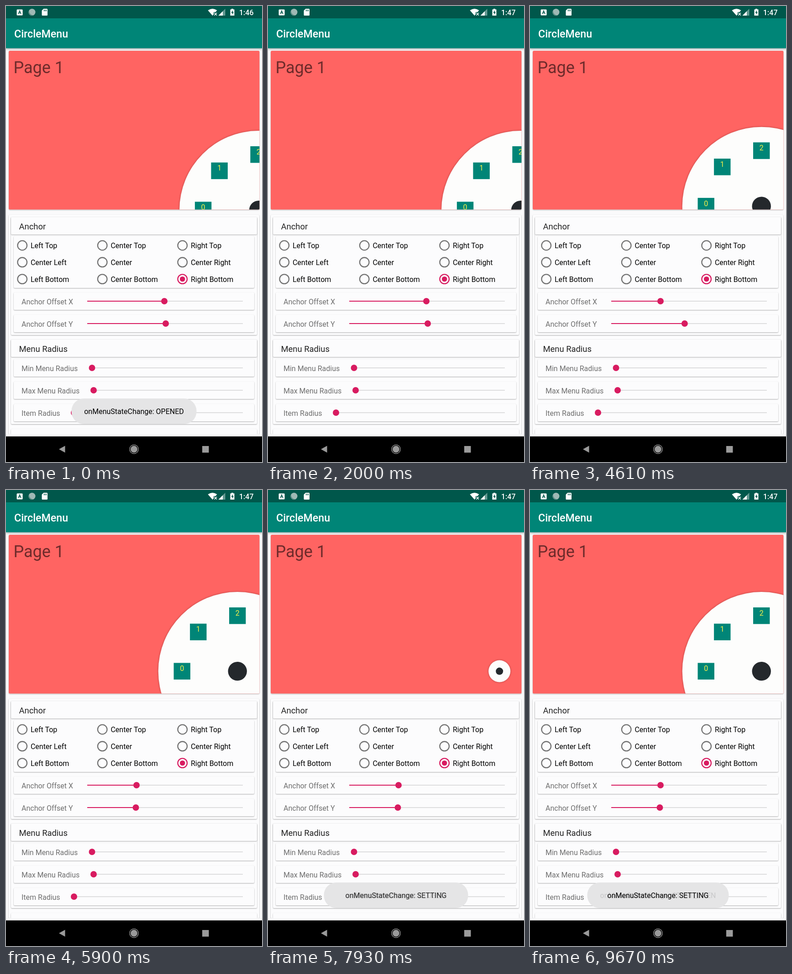
Animation, 561 px wide and 998 px high, one loop 9750 ms. Source, as an HTML page:

```html
<!DOCTYPE html>
<html lang="en">
<head>
<meta charset="utf-8">
<title>CircleMenu</title>
<style>
  html, body { margin: 0; width: 100%; height: 100%; overflow: hidden; background: #fafafb; }
  svg { display: block; width: 561px; height: 998px; font: 16px Roboto, sans-serif; }
  .card { fill: #fcfcfd; filter: drop-shadow(0 1.5px 1.3px rgba(0, 0, 0, .32)); }
  .head { font-size: 18.4px; fill: #222; }
  .label { fill: #6e6e6e; }
  .accent { fill: #d81b60; }
  .mid { text-anchor: middle; }
</style>
</head>
<body>
<svg id="stage" viewBox="0 0 561 998">
  <defs>
    <clipPath id="page"><rect x="6" y="98" width="549.5" height="347.5" rx="2.5"/></clipPath>
    <clipPath id="panel"><rect x="0" y="450" width="561" height="487"/></clipPath>
  </defs>
  <rect width="561" height="998" fill="#fafafb"/>

  <rect y="27" width="561" height="65.5" fill="#008577" style="filter:drop-shadow(0 2px 2px rgba(0,0,0,.3))"/>
  <rect width="561" height="27" fill="#00574b"/>
  <text x="18" y="69" font-size="23.2" font-weight="500" fill="#fff">CircleMenu</text>

  <g fill="#fff">
    <rect x="23.5" y="7.5" width="13" height="13" rx="1.5"/>
    <path d="M27 17.5L30 10.5L33 17.5M28 15.3H32" fill="none" stroke="#00574b" stroke-width="1.5"/>
    <circle cx="57" cy="13.5" r="7.5" fill="#9fb9b5"/>
    <path d="M51 9A7.5 7.5 0 0 0 61 20A9 9 0 0 1 51 9" fill="#5d8f87"/>
    <path d="M82.5 6H89.5Q91 6 91 7.5V19.5Q91 21 89.5 21H80Q78.5 21 78.5 19.5V10Z"/>
    <path d="M83.5 8V11.5M86 8V11.5M88.5 8V11.5" stroke="#00574b" stroke-width="1.2"/>
    <path d="M442.500 9.500Q452.500 2.500 462.500 9.500L459 13.500H455V18.500L452.500 21Z"/>
    <path d="M456.500 15L462 20.500M462 15L456.500 20.500" stroke="#fff" stroke-width="1.6"/>
    <path d="M480.500 6V21H465.500Z" opacity=".4"/>
    <path d="M475 11.500V21H465.500Z"/>
    <path d="M491.500 7.500H494V6H498V7.500H500.500V21H491.500Z"/>
    <path d="M497 9.500L493.500 15H495.700V19L499 13.500H497Z" fill="#00574b"/>
    <text id="clock" x="511" y="20" font-weight="500"></text>
  </g>

  <rect class="card" x="6" y="98" width="549.5" height="347.5" rx="2.5"/>
  <g clip-path="url(#page)">
    <rect x="6" y="98" width="550" height="348" fill="#ff6462"/>
    <text x="16.500" y="147" font-size="36" fill="#6f2b2b">Page 1</text>
    <g id="menu">
      <circle id="disc" fill="#fdfdfc" style="filter:drop-shadow(0 0 2px rgba(0,0,0,.3))"/>
      <g id="items"></g>
      <circle id="hub" fill="#24282c"/>
    </g>
  </g>

  <g id="settings" clip-path="url(#panel)"></g>

  <g id="toast" class="mid">
    <rect id="pill" y="859" height="56" rx="27" fill="#e5e5e6"/>
  </g>

  <rect y="942" width="561" height="56"/>
  <g fill="#9b9b9b">
    <path d="M116 970L129.500 962.500V977.500Z"/>
    <circle cx="280.500" cy="970" r="7.500"/>
    <circle cx="280.500" cy="970" r="9.700" fill="none" stroke="#9b9b9b" stroke-width="1.300"/>
    <rect x="430" y="963" width="14.500" height="14.500"/>
  </g>
</svg>
<script>
const LOOP = 9750, LAST_CHANGE = 9670, ITEM_MS = 165;
const $ = id => document.getElementById(id);

function add(parent, tag, attrs, text = '') {
  const el = document.createElementNS('http://www.w3.org/2000/svg', tag);
  set(el, attrs);
  el.textContent = text;
  return parent.appendChild(el);
}
function set(el, attrs) {
  for (const name in attrs) el.setAttribute(name, attrs[name]);
}
const clamp = v => Math.max(0, Math.min(1, v));

// Linear keyframes: time, value, time, value, ...
function track(t, ...keys) {
  let i = 0;
  while (i + 2 < keys.length && keys[i + 2] <= t) i += 2;
  if (t <= keys[0] || i + 2 >= keys.length) return keys[i + 1];
  const [t0, v0, t1, v1] = keys.slice(i, i + 4);
  return v0 + (v1 - v0) * (t - t0) / (t1 - t0);
}

const settings = $('settings');
const card = (x, y, right, bottom) =>
  add(settings, 'rect', { class: 'card', x, y, width: right - x, height: bottom - y, rx: 2 });

function section(title, top, bottom) {
  card(11, top, 550, bottom);
  card(11, top, 550, top + 38);
  add(settings, 'text', { class: 'head', x: 28.5, y: top + 26.5 }, title);
}

function slider(name, y, start) {
  card(17, y - 19, 544, y + 19);
  add(settings, 'text', { class: 'label', x: 34, y: y + 6.5 }, name);
  add(settings, 'rect', { x: start, y: y - .8, width: 519 - start, height: 1.7, fill: '#d9d9da' });
  const bar = add(settings, 'rect', { class: 'accent', x: start, y: y - 1, height: 2 });
  const ripple = add(settings, 'circle', { class: 'accent', cy: y, r: 18 });
  const thumb = add(settings, 'circle', { class: 'accent', cy: y, r: 7 });
  const move = (x, glow) => {
    set(bar, { width: x - start });
    set(ripple, { cx: x, opacity: glow * .25 });
    set(thumb, { cx: x });
  };
  move(start, 0);
  return move;
}

card(6, 457, 555, 937);
section('Anchor', 462, 720);
card(17, 504, 544, 617);
['Left Top', 'Center Top', 'Right Top', 'Center Left', 'Center', 'Center Right',
 'Left Bottom', 'Center Bottom', 'Right Bottom'].forEach((name, i) => {
  const cx = 35.7 + i % 3 * 175.5, cy = 524 + Math.floor(i / 3) * 36.8;
  const on = name === 'Right Bottom';
  add(settings, 'circle', { cx, cy, r: 10.3, fill: 'none', 'stroke-width': 2.3, stroke: on ? '#d81b60' : '#737373' });
  if (on) add(settings, 'circle', { class: 'accent', cx, cy, r: 5.7 });
  add(settings, 'text', { x: cx + 18.2, y: cy + 6 }, name);
});
const moveX = slider('Anchor Offset X', 646, 178);
const moveY = slider('Anchor Offset Y', 695, 178);
section('Menu Radius', 730, 915);
slider('Min Menu Radius', 792, 188.5);
slider('Max Menu Radius', 841, 192);
slider('Item Radius', 890, 149);
card(11, 926, 550, 960);

const items = Array.from({ length: 6 }, (_, i) => {
  const g = add($('items'), 'g', {});
  add(g, 'rect', { x: -18.2, y: -18.2, width: 36.4, height: 36.4, fill: '#008577' });
  add(g, 'text', { class: 'mid', y: -.5, fill: '#f6f04a' }, i);
  return g;
});

const toasts = {
  OPENED: [1150, 1, 1650, 0],
  START_CLOSE: [6240, 0, 6500, 1, 6700, 1, 7100, .12, 7600, .12, 7900, 0],
  CLOSED: [7900, 0, 8150, 1, 8350, 1, 8510, .45, 8700, 0],
  START_OPEN: [8390, 0, 8510, .35, 8700, 1, 8950, 1, 9300, .12],
  SETTING: [6700, 0, 7100, 1, 7850, 1, 8100, .5, 8510, .5, 8700, 0, 8950, 0, 9300, 1],
};
const toastTexts = Object.entries(toasts).map(([state, keys]) =>
  [add($('toast'), 'text', { x: 280.5, y: 893 }, 'onMenuStateChange: ' + state), keys]);

function drawMenu(t, x, y) {
  set($('menu'), { transform: `translate(${553.6 + (x - 347) * .76} ${446.6 + (y - 350) * .763})` });
  const open = t < 8100 ? 1 - clamp((t - 7400) / 500) : clamp((t - 8250) / 405);
  set($('disc'), { r: 24 + 149.5 * (1 - (1 - open) ** 3) });
  set($('hub'), { r: 8 + 12.7 * open ** 2 });
  items.forEach((item, i) => {
    const p = t < 8000
      ? 1 - clamp((t - 6240) / ITEM_MS - i)
      : clamp((t - 9010) / ITEM_MS - i);
    const angle = Math.PI * (1 + i / 4), dist = 121.5 * p;
    set(item, {
      transform: `translate(${dist * Math.cos(angle)} ${dist * Math.sin(angle)}) rotate(${360 * p}) scale(${p})`,
    });
  });
}

function draw(t) {
  $('clock').textContent = t < 1000 ? '1:46' : '1:47';
  const x = track(t, 2300, 347, 2830, 300, 2990, 300, 3200, 286);
  const y = track(t, 4609, 350, 4610, 339, 5150, 284.5);
  moveX(x, track(t, 2260, 0, 2400, 1, 3540, 1, 4030, 0));
  moveY(y, track(t, 4650, 0, 4790, 1, 5440, 1, 5900, 0));
  drawMenu(t, x, y);

  const width = t < 6240 ? 274 : t < 8650 ? 316 : 310;
  set($('pill'), {
    x: 280.5 - width / 2,
    width,
    opacity: track(t, 1150, 1, 1650, 0, 6240, 0, 6500, 1, 8350, 1, 8510, .4, 8700, 1),
  });
  for (const [text, keys] of toastTexts) set(text, { opacity: track(t, ...keys) });
}

function tick() {
  draw(Math.min(performance.now() % LOOP, LAST_CHANGE));
  requestAnimationFrame(tick);
}
tick();
</script>
</body>
</html>
```
